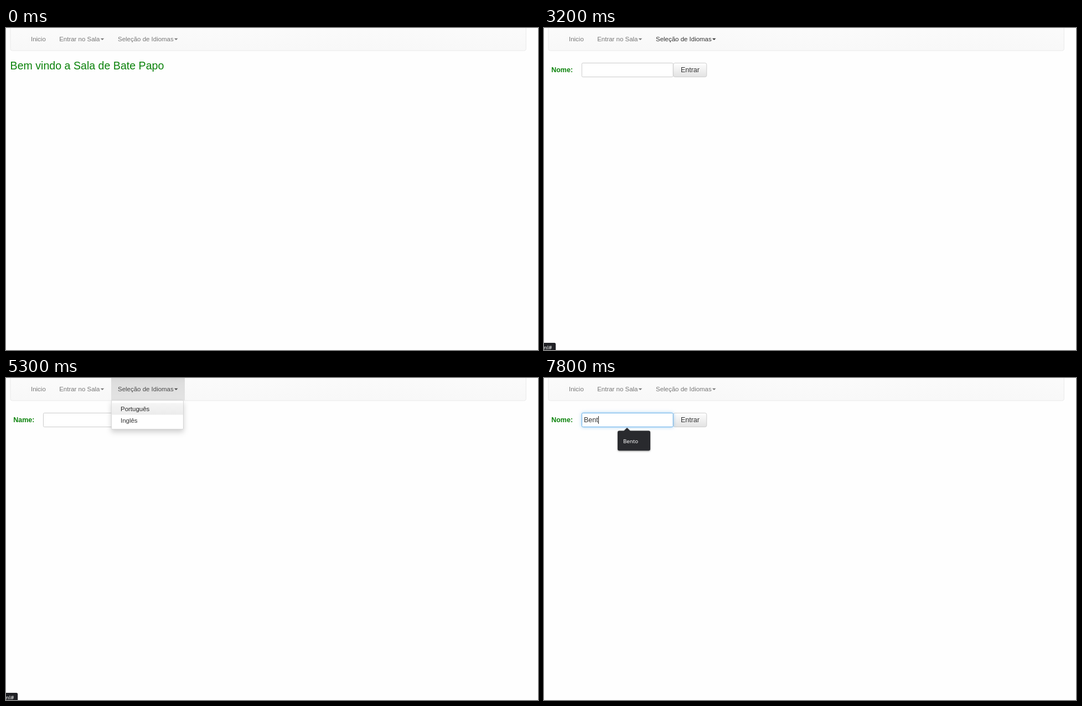
Animation of 961x583 px, one loop 8 s. Source, as an HTML page:

```html
<!DOCTYPE html>
<html lang="pt">
<head>
<meta charset="utf-8">
<title>Sala de Bate Papo</title>
<style>
html, body { margin: 0; width: 100%; height: 100%; overflow: hidden; background: #fefefe; }
svg { display: block; width: 961px; height: 583px; font: 11.48px "Liberation Sans", Arial, sans-serif; }
.form { font-size: 12.5px; fill: #333; }
.green { fill: #0a820a; }
.bold { font-weight: bold; }
.dark { font: 9.7px "Noto Sans", sans-serif; fill: #fff; }
.menu { fill: #fff; stroke: #ccc; stroke-width: .82; filter: drop-shadow(0 5px 5px rgba(0,0,0,.18)); }
.popup { fill: #292a2e; filter: drop-shadow(0 1px 1.5px rgba(0,0,0,.4)); }
.focus { stroke: #66afe9; filter: drop-shadow(0 0 3px rgba(102,175,233,.6)); }
</style>
</head>
<body>
<svg viewBox="0 0 961 583">
  <defs>
    <linearGradient id="bar" x2="0" y2="1"><stop stop-color="#fbfbfb"/><stop offset="1" stop-color="#f8f8f8"/></linearGradient>
    <linearGradient id="tab" x2="0" y2="1"><stop stop-color="#d8d8d8"/><stop offset=".25" stop-color="#dedede"/><stop offset="1" stop-color="#e3e3e3"/></linearGradient>
    <linearGradient id="item" x2="0" y2="1"><stop stop-color="#f5f5f5"/><stop offset="1" stop-color="#ececec"/></linearGradient>
    <linearGradient id="btn" x2="0" y2="1"><stop stop-color="#fff"/><stop offset="1" stop-color="#e2e2e2"/></linearGradient>
  </defs>
  <rect x="8" y="-10" width="931.3" height="51" rx="3.3" fill="url(#bar)" stroke="#e7e7e7" stroke-width=".9"/>
  <g id="view"></g>
</svg>
<script>
const LOOP = 8000;
const view = document.getElementById('view');

const tabs = [
  { label: 'Inicio', x: 45, left: 33, right: 84 },
  { label: 'Entrar no Sala', x: 96.2, left: 84, right: 189.5, caret: 174,
    width: 144.5, items: ['Entrar no Chat Online'] },
  { label: 'Seleção de Idiomas', x: 202, left: 190, right: 323, caret: 307.2,
    width: 130, items: ['Português', 'Inglês'] }
];

const forms = {
  pt: { label: 'Nome:', button: 'Entrar', x: 68.4, end: 294 },
  en: { label: 'Name:', button: 'Enter', x: 67.5, end: 289.3 }
};

const names = ['Bento', 'Caio', 'Lia'];

// Each entry changes part of the running state.
// tip: [text, width]; hover, open and item are indices, -1 for none.
const steps = [
  [0, { hover: -1, open: -1, item: -1, tip: null, form: null, focus: false, caret: false, typed: '', hints: 0 }],
  [700, { hover: 0 }],
  [1200, { open: 0, tip: ['html', 21] }],
  [1400, { hover: -1, open: -1 }],
  [1500, { hover: 1, tip: ['html#', 27] }],
  [1800, { open: 1 }],
  [2500, { item: 0, tip: ['html', 15.7] }],
  [2600, { open: -1, item: -1, hover: -1 }],
  [2700, { tip: null }],
  [2900, { form: 'pt' }],
  [3100, { hover: 2 }],
  [3200, { tip: ['html#', 21.2] }],
  [3400, { open: 2 }],
  [3700, { item: 0 }],
  [3900, { item: 1 }],
  [4000, { open: -1, item: -1, hover: -1 }],
  [4100, { form: 'en' }],
  [4200, { tip: null }],
  [4900, { hover: 2 }],
  [5100, { open: 2 }],
  [5200, { tip: ['html#', 21.2] }],
  [5300, { item: 0 }],
  [5500, { open: -1, item: -1, hover: -1 }],
  [5600, { form: 'pt' }],
  [5700, { tip: null }],
  [6100, { focus: true, caret: true }],
  [6200, { hints: 3 }],
  [6600, { caret: false }],
  [7100, { caret: true }],
  [7200, { typed: 'B', hints: 0 }],
  [7400, { typed: 'Be', hints: 1 }],
  [7600, { typed: 'Ben' }],
  [7800, { typed: 'Bent' }]
];

const rect = (x, y, w, h, rest) => `<rect x="${x}" y="${y}" width="${w}" height="${h}" ${rest}/>`;
const text = (x, y, str, rest = '') => `<text x="${x}" y="${y}" ${rest}>${str}</text>`;

function drawTab(tab, i, s) {
  const open = s.open === i;
  const color = open ? '#484848' : s.hover === i ? '#333' : '#777';
  let out = open ? rect(tab.left, 0, tab.right - tab.left, 40.6, 'fill="url(#tab)"') : '';
  out += text(tab.x, 23.6, tab.label, `fill="${color}"`);
  if (tab.caret) out += `<path d="M${tab.caret - 3.3} 18.8h6.6l-3.3 3.3z" fill="${color}"/>`;
  return out;
}

function drawMenu(tab, item) {
  const row = 21.3, top = 45.2;
  const height = 9.8 + row * tab.items.length;
  let out = rect(tab.left + .4, 40.4, tab.width, height, 'rx="1.5" class="menu"');
  tab.items.forEach((label, i) => {
    const y = top + i * row;
    if (i === item) out += rect(tab.left + .8, y, tab.width - .8, row, 'fill="url(#item)"');
    out += text(tab.left + 17, y + 14.4, label, `fill="${i === item ? '#262626' : '#333'}"`);
  });
  return out;
}

function drawForm(s) {
  const f = forms[s.form];
  const split = f.x + 165;
  let out = text(13.2, 80, f.label, 'class="form green bold"');
  out += rect(split + .3, 63.4, f.end - split - .5, 25.2, 'rx="3" fill="url(#btn)" stroke="#c8c8c8" stroke-width=".9"');
  out += text((split + f.end) / 2 + .2, 80, f.button, 'class="form" text-anchor="middle"');
  out += rect(f.x, 63.4, 164.8, 25.2, `rx="2" fill="#fff" stroke="#ccc" ${s.focus ? 'class="focus"' : ''}`);
  return out + text(72, 80, s.typed, 'class="form" id="typed"');
}

function drawHints(n) {
  const h = 6 + 30 * n;
  let out = `<g class="popup"><path d="M143.5 96.5l6.5-6.5 6.5 6.5z"/>${rect(133, 95.5, 59, h, 'rx="3"')}</g>`;
  names.slice(0, n).forEach((name, i) => out += text(143, 117.6 + 30 * i, name, 'class="dark"'));
  return out;
}

function drawTip([str, w]) {
  return `<path d="M0 570H${w - 2.5}q2.5 0 2.5 2.5V583H0z" fill="#202125"/>` +
    text(w - 6.7, 582, str, 'class="dark" text-anchor="end"');
}

function draw(s) {
  let out = tabs.map((tab, i) => drawTab(tab, i, s)).join('');
  out += s.form ? drawForm(s) : text(7.6, 75, 'Bem vindo a Sala de Bate Papo', 'class="green" font-size="19.6"');
  if (s.open > 0) out += drawMenu(tabs[s.open], s.item);
  if (s.hints) out += drawHints(s.hints);
  if (s.tip) out += drawTip(s.tip);
  view.innerHTML = out;
  if (s.caret) {
    const w = s.typed ? document.getElementById('typed').getComputedTextLength() : 0;
    view.insertAdjacentHTML('beforeend', rect(Math.round(72 + w), 69, 1, 14, 'fill="#222"'));
  }
}

let shown = -1;
const start = performance.now();

function tick() {
  const t = (performance.now() - start) % LOOP;
  const past = steps.filter(([at]) => at <= t);
  if (past.length !== shown) {
    shown = past.length;
    draw(Object.assign({}, ...past.map(([, change]) => change)));
  }
  requestAnimationFrame(tick);
}
tick();
</script>
</body>
</html>
```
